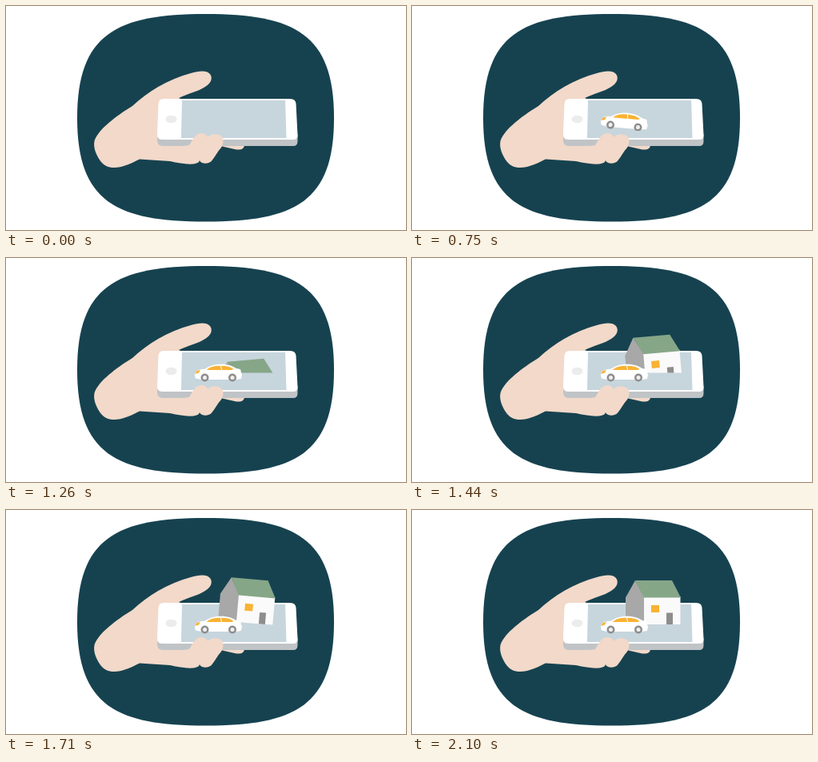
Animation, 500 px wide and 280 px high, one loop 2460 ms. Source, as an HTML page with a canvas:

```html
<!DOCTYPE html>
<html lang="en">
<head>
<meta charset="utf-8">
<title>House and car on a phone</title>
<style>
html, body { margin: 0; width: 100%; height: 100%; overflow: hidden; background: #fff; }
canvas { display: block; width: 500px; height: 280px; }
</style>
</head>
<body>
<canvas id="stage"></canvas>
<script>
const LOOP = 2460, W = 500, H = 280;
const canvas = document.getElementById('stage');
const ctx = canvas.getContext('2d');
const dpr = window.devicePixelRatio || 1;
canvas.width = W * dpr;
canvas.height = H * dpr;

const SKIN = '#f2d9c9', ORANGE = '#f9b233', GREY = '#8d8d8d';

const fill = (color, d) => {
  ctx.fillStyle = color;
  ctx.fill(new Path2D(d));
};

const oval = (color, x, y, rx, ry = rx) => {
  ctx.fillStyle = color;
  ctx.beginPath();
  ctx.ellipse(x, y, rx, ry, 0, 0, Math.PI * 2);
  ctx.fill();
};

// keys: [time, lift, tilt in degrees], joined with a sine ease
function pose(keys, t) {
  let i = 1;
  while (i < keys.length - 1 && t > keys[i][0]) i++;
  const a = keys[i - 1], b = keys[i];
  const k = Math.min(1, Math.max(0, (t - a[0]) / (b[0] - a[0])));
  const e = (1 - Math.cos(Math.PI * k)) / 2;
  return [a[1] + (b[1] - a[1]) * e, a[2] + (b[2] - a[2]) * e];
}

const carKeys = [[510, 30, 5], [870, -9, 5], [990, -4, 5], [1110, 0, 0]];
const houseKeys = [
  [1050, 60, -5], [1590, -1, -5], [1710, -2, 5],
  [1800, -11, 9], [1935, -9, -8], [2080, 0, 0]
];

// Draws a part rising out of a horizontal floor line
function rise(draw, keys, t, px, py, floor) {
  if (t < keys[0][0]) return;
  const [lift, tilt] = pose(keys, t);
  ctx.save();
  ctx.beginPath();
  ctx.rect(0, 0, W, floor);
  ctx.clip();
  ctx.translate(px, py + lift);
  ctx.rotate(tilt * Math.PI / 180);
  ctx.translate(-px, -py);
  draw();
  ctx.restore();
}

function backdrop() {
  fill('#164250', 'M89 140C89 35 138 10 249.5 10S410 35 410 140S361 269.5 249.5 269.5S89 245 89 140Z');
}

function palm() {
  fill(SKIN, 'M268 172L298 173C298 178 295 180 288 179.5L268 175Z');
  fill(SKIN, 'M216 115C228 109 240 107 249 101C256 97 259 90 255 85C251 80 241 81 231 84' +
    'C202 92 177 107 158 125C142 135 120 150 112 165C107 174 113 188 120 196' +
    'C127 204 140 203 150 199C157 197 161 194 167 191.5L205 194L250 180V130Z');
}

function phone() {
  fill('#c0c4c7', 'M189 160H364.5V169Q364.5 175 359 175H196Q189 175 189 168Z');
  fill('#fff', 'M197 116H355Q362 116 362.5 122L364.5 161Q365 167 359 167H195Q188.5 167 189 160L190.5 122Q191 116 197 116Z');
  fill('#c7d5dd', 'M220 118H349L350.5 165H219Z');
  oval('#ececec', 206.5, 141.5, 7, 4.8);
}

function fingers() {
  fill(SKIN, 'M205 192L222 175L229 174C232 170 233 166 236 163C241 157 250 158 252 164' +
    'C257 159 264 160 268 162C273 165 272 173 269 177C264 182 262 188 257.5 193' +
    'C254 198 244 198 242 193C240 200 222 198 205 194Z');
}

function house() {
  fill('#a8a8a8', 'M279 88L290.5 109V143H267V109.5Z');
  fill('#fafafa', 'M290 108H335.5V143H290Z');
  fill('#86a688', 'M279 88H325L336 109.5H290Z');
  fill(ORANGE, 'M299 119H309V128H299Z');
  fill(GREY, 'M318 128.5H326V143H318Z');
}

function wheel(x) {
  oval(GREY, x, 149.5, 5);
  oval('#f0f0f0', x, 149.5, 2.5);
}

function car() {
  fill('#fff', 'M236 147Q236 142 241 139.5L249 138.5C255 134 262 132.7 269 132.7' +
    'C278 132.7 283 135 288 138L293 139Q294 144 295 146L294 151L288 152H244L237 150.5Z');
  fill(ORANGE, 'M250.5 140C255 136 260 134.7 268 134.7L269 140Z');
  fill(ORANGE, 'M269 134.7C276 134.7 281 136 284.5 139L282 140H270Z');
  fill(ORANGE, 'M236.5 145L238 141.5L243 139.5L241 143.5Z');
  wheel(248.5);
  wheel(283);
}

function frame(now) {
  const t = Math.max(0, now - start) % LOOP;
  ctx.setTransform(dpr, 0, 0, dpr, 0, 0);
  ctx.fillStyle = '#fff';
  ctx.fillRect(0, 0, W, H);
  backdrop();
  palm();
  phone();
  rise(house, houseKeys, t, 301.5, 119, 143.5);
  rise(car, carKeys, t, 265.5, 144, 156);
  fingers();
  requestAnimationFrame(frame);
}

const start = performance.now();
frame(start);
</script>
</body>
</html>
```
